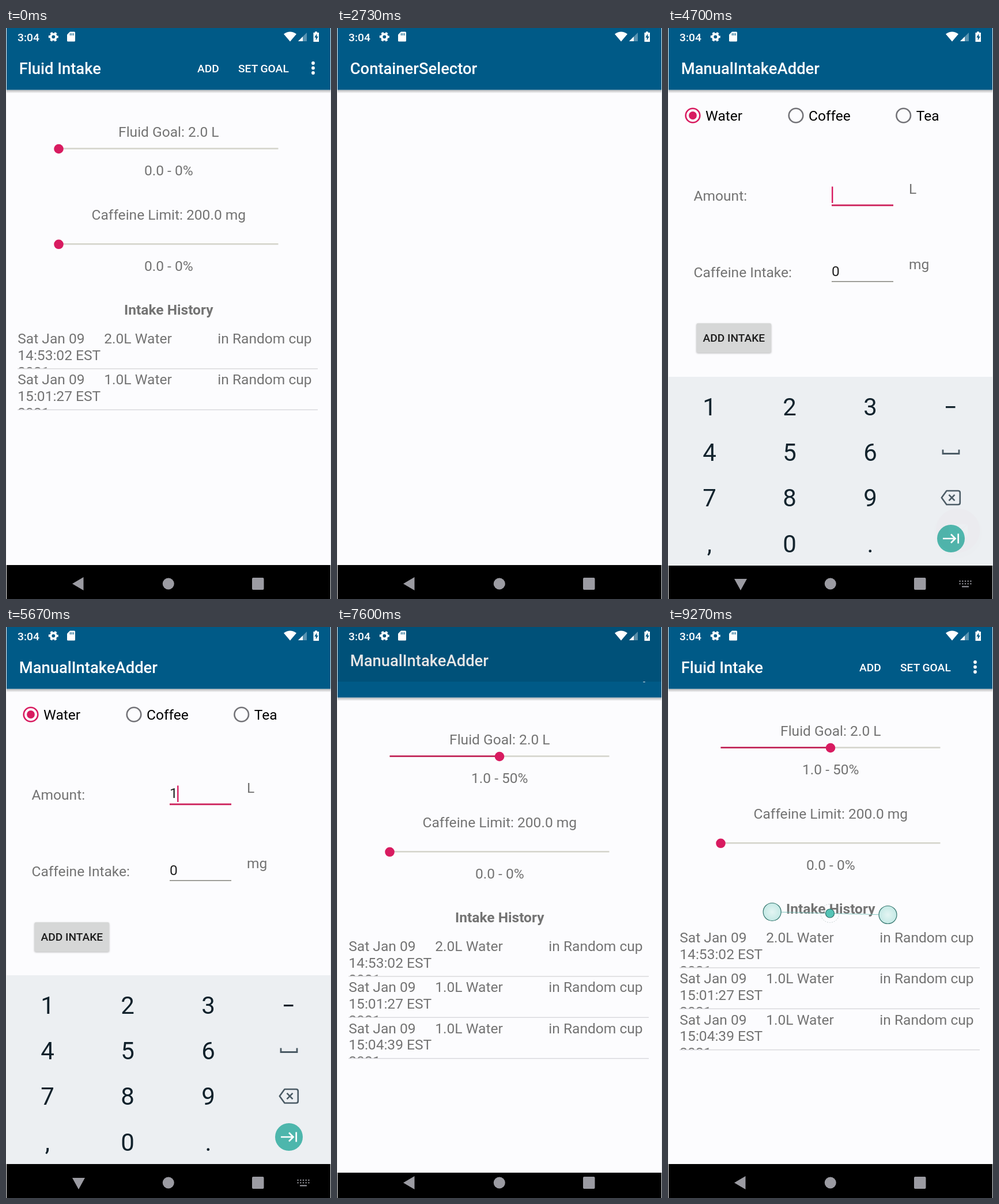
An HTML page that plays this animation: 564x992 px, repeating every 9330 ms.

```html
<!DOCTYPE html>
<html lang="en">
<head>
<meta charset="utf-8">
<title>Fluid Intake</title>
<style>
html, body { margin: 0; width: 100%; height: 100%; overflow: hidden; background: #000; }
#stage { position: relative; width: 564px; height: 992px; overflow: hidden; background: #000; }
svg { position: absolute; left: 0; top: 0; overflow: hidden; }
text { font-family: Roboto, sans-serif; font-size: 24.55px; white-space: pre; }
.title { font-size: 27.4px; font-weight: 500; fill: #fff; }
.menu { font-size: 19.2px; font-weight: 500; }
.key { font-size: 42px; fill: #10212b; text-anchor: middle; }
.mid { text-anchor: middle; }
</style>
</head>
<body>
<div id="stage"></div>
<script>
const LOOP = 9330, OPEN = 425, W = 564, H = 992, BODY = 933;
const PINK = '#d81b60', GREY = '#737373', BLUE = '#005a87', PAPER = '#fcfcfe', NAV = '#9b9ba2';
const stage = document.getElementById('stage');

// Markup helpers
const text = (x, y, s, fill = GREY, cls = '', more = '') =>
  `<text x="${x}" y="${y}" fill="${fill}" class="${cls}" ${more}>${s}</text>`;
const mid = (y, s, more) => text(282.3, y, s, GREY, 'mid', more);
const rect = (x, y, w, h, fill, more = '') =>
  `<rect x="${x}" y="${y}" width="${w}" height="${h}" fill="${fill}" ${more}/>`;
const dot = (x, y, r, fill, more = '') =>
  `<circle cx="${x}" cy="${y}" r="${r}" fill="${fill}" ${more}/>`;
const path = (d, fill, more = '') => `<path d="${d}" fill="${fill}" ${more}/>`;
const line = (d, color, width, more = '') =>
  path(d, 'none', `stroke="${color}" stroke-width="${width}" ${more}`);
const group = (id, s) => `<g id="${id}">${s}</g>`;

function layer(height, content) {
  stage.insertAdjacentHTML('beforeend',
    `<svg width="${W}" height="${height}" viewBox="0 0 ${W} ${height}">${content}</svg>`);
  return stage.lastElementChild;
}

const page = (title, content) =>
  rect(0, 0, W, BODY, PAPER) + rect(0, 107.5, W, 6, 'url(#shade)') +
  rect(0, 0, W, 107.5, BLUE) + text(22.7, 80, title, '#fff', 'title') + content;

function slider(y, part) {
  const x = 91.5 + 381 * part;
  return rect(91.5, y - 1.3, 381, 2.6, '#d5d5cc') +
    rect(91.5, y - 1.3, x - 91.5, 2.6, '#c21d53') + dot(x, y + .5, 8.3, PINK);
}

function historyRow(i, time, amount) {
  const y = 520.6 + i * 71.3;
  return `<svg x="0" y="${y}" width="${W}" height="71">` +
    text(20.3, 27.4, 'Sat Jan 09') + text(20.3, 56.3, time + ' EST') + text(20.3, 85.2, '2021') +
    text(170.3, 27.4, amount + 'L Water') + text(367.3, 27.4, 'in Random cup') + '</svg>' +
    rect(20, y + 70.7, 521, 1.4, '#d7d7db');
}

const drinks = [['14:53:02', '2.0'], ['15:01:27', '1.0'], ['15:04:39', '1.0']];
const mainPage = (label, part, count) => page('Fluid Intake',
  text(332, 76.5, 'ADD', '#fff', 'menu') + text(403, 76.5, 'SET GOAL', '#fff', 'menu') +
  [61, 69.5, 78].map(y => dot(533, y, 2.9, '#fff')).join('') +
  mid(189, 'Fluid Goal: 2.0 L') + slider(209.5, part) + mid(256, label) +
  mid(333, 'Caffeine Limit: 200.0 mg') + slider(375.3, 0) + mid(422, '0.0 - 0%') +
  mid(498, 'Intake History', 'font-weight="700"') +
  drinks.slice(0, count).map((d, i) => historyRow(i, ...d)).join(''));

const radio = (x, label, on) =>
  dot(x, 152, 12.3, 'none', `stroke="${on ? PINK : '#737378'}" stroke-width="2.6"`) +
  (on ? dot(x, 152, 6.9, PINK) : '') + text(x + 22, 161, label, '#000');

const envelope = path('M487 862h33v22h-33z', '#f4f0f2') +
  line('M487.5 862.5L503.5 875.5L519.5 862.5M487.5 883.5L498.5 872M519.5 883.5L508.5 872', PINK, 1.6);

const adderPage = page('ManualIntakeAdder',
  radio(43, 'Water', true) + radio(222, 'Coffee') + radio(408.7, 'Tea') +
  text(44.5, 300, 'Amount:') + text(418, 288, 'L') +
  group('blur', rect(284, 306.5, 107, 1.4, '#77776f')) +
  group('focus', rect(284, 306.6, 107, 2.8, '#cc1d58')) +
  group('one', text(284, 297, '1', '#222')) +
  group('cursor', rect(-1.2, 275.5, 2.4, 28.5, PINK)) +
  text(44.5, 433, 'Caffeine Intake:') + text(284, 431, '0', '#222') + text(418, 418.5, 'mg') +
  rect(284, 439.8, 107, 1.4, '#77776f') +
  group('button', rect(49.5, 513, 129.5, 51, '#d6d7d7', 'rx="2.5"')) +
  text(114.3, 545, 'ADD INTAKE', '#1c1c1c', 'menu mid') +
  dot(503, 873, 38.3, PINK, 'style="filter:drop-shadow(0 5px 5px rgba(0,0,0,.3))"') + envelope);

// Screens in stacking order, with the time each one opens
const screens = [
  { at: -OPEN, body: mainPage('0.0 - 0%', 0, 2) },
  { at: 1557.4, body: page('ContainerSelector', '') },
  { at: 3288, body: adderPage },
  { at: 7428, body: mainPage('1.0 - 50%', .5, 3) }
];

// Navigation icons lie under the windows
layer(H,
  group('back', path('M115 965.5L134.5 954v23z', NAV)) +
  group('down', path('M115 957h22L126 977z', NAV) +
    line('M505.5 961h21M505.5 965.5h21', NAV, 2.2, 'stroke-dasharray="2.2 2.5"') +
    line('M510 970.5h12', NAV, 2)) +
  dot(281.8, 965.5, 10, NAV) + rect(427, 955, 20.5, 21, NAV, 'rx="2"'));

screens.forEach(s => s.el = layer(BODY, s.body));

// Number keyboard
const cols = [72, 211, 351], INK = '#4a5a64';
const keys = ['123', '456', '789', ',0.'].map((row, r) =>
  [...row].map((k, c) => text(cols[c], 672 + r * 79.2, k, '', 'key')).join('')).join('');
const pad = layer(BODY, rect(0, 605, W, 328, '#eceff2') + keys +
  rect(482, 656, 16.5, 3.2, '#10212b') +
  line('M477 731.5v7h28v-7', INK, 2.8) +
  line('M474.8 815L483.5 803h20q3.3 0 3.3 3.3v17.4q0 3.3-3.3 3.3h-20z', INK, 2.6, 'stroke-linejoin="round"') +
  line('M487.5 809.8l10 10.4m0-10.4l-10 10.4', INK, 2.6) +
  dot(491, 886, 24, '#4db6ac') +
  line('M477 886h22m-8-7.5l7.5 7.5l-7.5 7.5M503.7 877.5v17', '#fff', 2.7));

// Status bar, touch marks and edges
const mark = (x, y) => dot(x, y, 15.5, 'url(#touch)', 'stroke="#35766f" stroke-width="1.2"');
layer(H,
  `<defs><linearGradient id="shade" x2="0" y2="1"><stop stop-opacity=".28"/>
   <stop offset="1" stop-opacity="0"/></linearGradient>
   <radialGradient id="touch"><stop stop-color="#e4f5f3"/><stop offset="1" stop-color="#c4e9e5"/></radialGradient></defs>` +
  text(20, 22.5, '3:04', '#fff', 'menu') +
  dot(82.3, 15.3, 4.7, 'none', 'stroke="#fff" stroke-width="3.6"') +
  dot(82.3, 15.3, 7.2, 'none', 'stroke="#fff" stroke-width="2.6" stroke-dasharray="4 3.54" stroke-dashoffset="2"') +
  path('M111 6.5h7.5q1.5 0 1.5 1.5v14q0 1.5-1.5 1.5h-11q-1.5 0-1.5-1.5v-10.5z', '#fff') +
  line('M111.5 9v4m2.8-4v4m2.8-4v4', BLUE, 1.2) +
  path('M482 10.5q11-8 22 0L493 23.5z', '#fff') +
  path('M522 8v15h-15z', '#fff', 'opacity=".35"') + path('M515 15v8h-8z', '#fff') +
  path('M536 8v-1.8h4v1.8h3v16h-9.5v-16z', '#fff') +
  path('M539.3 10l-4 6.5h2.5v5l4-6.8h-2.5z', BLUE) +
  group('touches',
    line('M196 495.3L366 499.7', '#7cc4bd', .9) +
    dot(281, 497.5, 16, 'none', 'stroke="#b8c4c6" stroke-width=".8" stroke-dasharray="2 2"') +
    mark(180.7, 495) + mark(381.5, 500) +
    dot(281, 497.5, 7.5, '#55c4b6', 'stroke="#2c6e68" stroke-width="1.2"')) +
  rect(0, 0, 1, H, '#f0f0f0') + rect(563, 0, 1, H, '#e4e8ec'));

// Easing: y at x on a cubic curve given by four points
function curve(x, [ax, ay, bx, by, cx, cy, dx, dy]) {
  const at = (u, a, b, c, d) => {
    const v = 1 - u;
    return v * v * v * a + 3 * v * v * u * b + 3 * v * u * u * c + u * u * u * d;
  };
  let lo = 0, hi = 1;
  for (let i = 0; i < 24; i++) {
    const u = (lo + hi) / 2;
    if (at(u, ax, bx, cx, dx) < x) lo = u; else hi = u;
  }
  return at(lo, ay, by, cy, dy);
}
const clamp = x => Math.min(1, Math.max(0, x));
const slideEase = x => curve(x, [0, 0, .4, 0, .2, 1, 1, 1]);
const clipEase = x => x < 1 / 6
  ? curve(x, [0, 0, .05, 0, .1333, .06, 1 / 6, .4])
  : curve(x, [1 / 6, .4, .2083, .82, .25, 1, 1, 1]);

const FOCUS = 4500, PAD_IN = 4560, TYPED = 5640, PRESS = 7180, LEAVE = screens[3].at;
const els = Object.fromEntries(
  ['back', 'down', 'blur', 'focus', 'one', 'cursor', 'button', 'touches']
    .map(id => [id, document.getElementById(id)]));
const show = (el, on) => { el.style.display = on ? '' : 'none'; };

// Windows move by whole pixels so that their edges stay sharp
function drawScreens(t) {
  screens.forEach(({ at, el }, i) => {
    const next = screens[i + 1] ? screens[i + 1].at : Infinity;
    el.style.visibility = t >= at && t < next + OPEN ? 'visible' : 'hidden';
    const enter = clamp((t - at) / OPEN), leave = clamp((t - next) / OPEN);
    const y = Math.round(.04 * H * (1 - slideEase(enter)) - .02 * H * slideEase(leave));
    const top = Math.min(BODY, Math.round(.959 * H * (1 - clipEase(enter))));
    el.style.transform = `translateY(${y}px)`;
    el.style.clipPath = top > 0 ? `inset(${top}px 0 0 0)` : 'none';
    el.style.opacity = 1 - .1 * clamp((t - next) / 117);
  });
}

function drawForm(t) {
  const focused = t >= FOCUS, typed = t >= TYPED;
  show(els.focus, focused);
  show(els.blur, !focused);
  show(els.one, typed);
  const since = t - (typed ? TYPED : FOCUS);
  show(els.cursor, focused && since % 1000 < 500);
  els.cursor.setAttribute('transform', `translate(${typed ? 298.3 : 285.2} 0)`);
  els.button.style.filter = t >= PRESS
    ? 'drop-shadow(0 1px 1.5px rgba(0,0,0,.35))'
    : 'drop-shadow(0 1.5px 1.5px rgba(0,0,0,.28))';
}

function drawPad(t) {
  const rise = 1 - Math.pow(1 - clamp((t - PAD_IN) / 220), 4);
  const fade = clamp((t - LEAVE) / 150);
  pad.style.visibility = t >= PAD_IN && fade < 1 ? 'visible' : 'hidden';
  pad.style.opacity = rise * (1 - fade);
  pad.style.transform = `translateY(${Math.round(60 * (1 - rise) + 30 * fade)}px)`;
  const open = t >= PAD_IN && t < LEAVE;
  show(els.down, open);
  show(els.back, !open);
}

const start = performance.now();
function frame() {
  const t = (performance.now() - start) % LOOP;
  drawScreens(t);
  drawForm(t);
  drawPad(t);
  show(els.touches, t >= 9240);
  requestAnimationFrame(frame);
}
frame();
</script>
</body>
</html>
```
